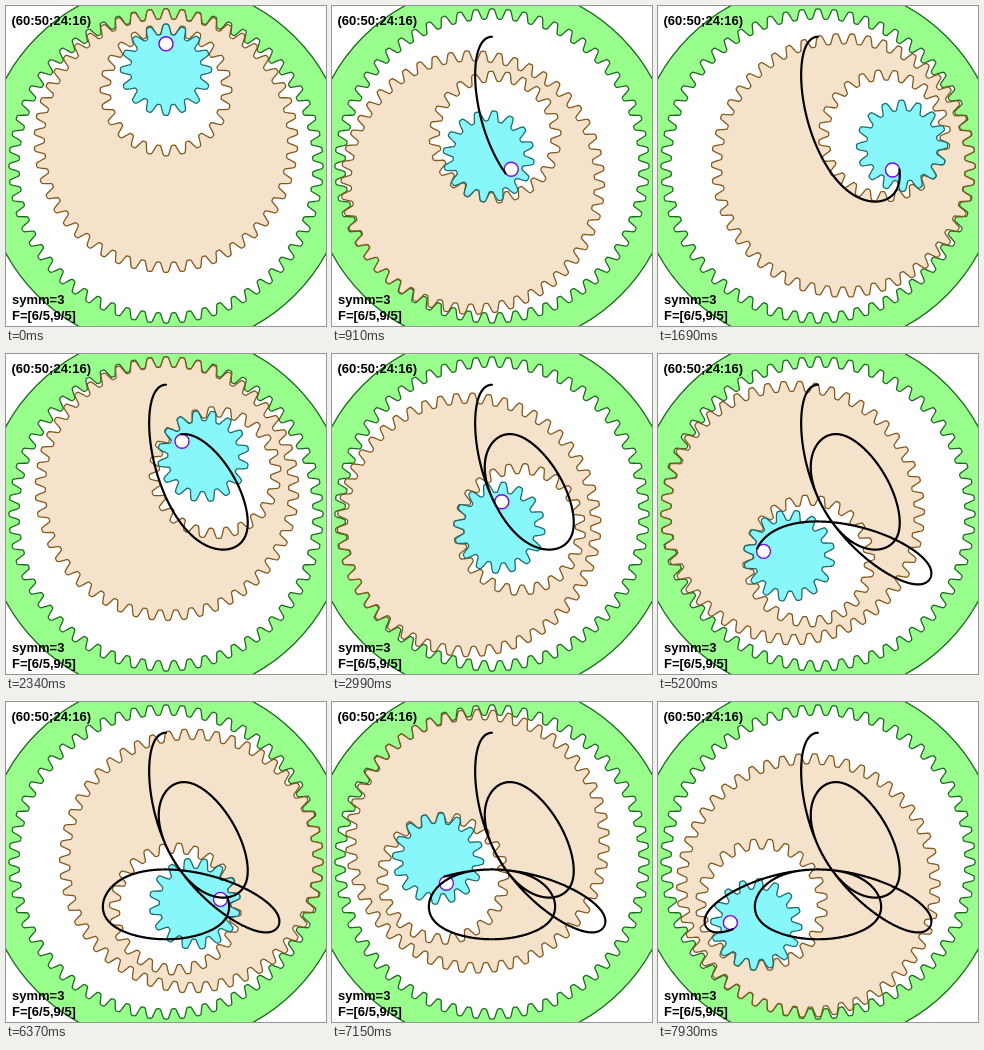
Animation, 320 px wide and 320 px high, one loop 8 s. Source, as an HTML page with a canvas:

```html
<!DOCTYPE html>
<html lang="en">
<head>
<meta charset="utf-8">
<title>Nested gears</title>
<style>
html, body { margin: 0; width: 100%; height: 100%; overflow: hidden; background: #fff; }
canvas { display: block; width: 320px; height: 320px; }
</style>
</head>
<body>
<canvas id="stage"></canvas>
<script>
const LOOP = 8000, STEP = 130;
const STEPS_PER_PERIOD = 89 / 3;   // a third of the full figure
const MID = 160, UNIT = 152 / 60;  // pitch radius per tooth
const RING = 60, WHEEL = 50, HOLE = 24, GEAR = 16;
const HOLE_OFFSET = 20 * UNIT, PEN_OFFSET = 26, PEN_HOLE = 7;
const RIM = 72 * UNIT;
const RAD = Math.PI / 180, UP = -Math.PI / 2;

const canvas = document.getElementById('stage');
const ctx = canvas.getContext('2d');
const dpr = window.devicePixelRatio || 1;
canvas.width = canvas.height = 320 * dpr;

const move = (p, r, a) => ({ x: p.x + r * Math.cos(a), y: p.y + r * Math.sin(a) });

// Both turns are measured counter-clockwise from the upright start.
function pose(wheelTurn, gearTurn) {
  const a = UP - wheelTurn, b = UP - gearTurn;
  const wheelRot = wheelTurn * (RING / WHEEL - 1);
  const ratio = HOLE / GEAR;
  const gearRot = wheelRot * ratio + gearTurn * (ratio - 1);
  const centre = { x: MID, y: MID };
  const wheel = move(centre, (RING - WHEEL) * UNIT, a);
  const hole = move(wheel, HOLE_OFFSET, UP + wheelRot);
  const gear = move(hole, (HOLE - GEAR) * UNIT, b);
  const pin = move(gear, PEN_OFFSET, UP + gearRot);
  const outer = move(centre, RING * UNIT, a);
  const inner = move(hole, HOLE * UNIT, b);
  const pen = move(pin, PEN_HOLE, Math.atan2(outer.y - pin.y, outer.x - pin.x));
  return { wheel, hole, gear, pin, pen, outer, inner, wheelRot, gearRot };
}

// The push of the pen acts on one line through both contact points.
function skew(wheelTurn, gearTurn) {
  const { pin, inner, outer } = pose(wheelTurn, gearTurn);
  return (inner.x - pin.x) * (outer.y - inner.y) - (inner.y - pin.y) * (outer.x - inner.x);
}

function balance(turn, guess) {
  const h = 1e-4;
  for (let i = 0; i < 6; i++) {
    const slope = (skew(turn, guess + h) - skew(turn, guess - h)) / (2 * h);
    const d = skew(turn, guess) / slope;
    guess -= Math.max(-0.1, Math.min(0.1, d));
  }
  return guess;
}

const FINE = 0.5, PERIOD = 600 / FINE;
const track = [];
let gearTurn = 0, length = 0;
for (let i = 0; i <= 1320 / FINE; i++) {
  const turn = i * FINE * RAD;
  gearTurn = balance(turn, gearTurn);
  const pen = pose(turn, gearTurn).pen;
  if (i) length += Math.hypot(pen.x - track[i - 1].pen.x, pen.y - track[i - 1].pen.y);
  track.push({ turn, gearTurn, pen, length });
}
// Pace: half even pen speed, half even turning.
const lap = track[PERIOD].length;
track.forEach((p, i) => { p.when = (p.length / lap + i / PERIOD) / 2 * STEPS_PER_PERIOD; });

// Straight flanks with softened corners, from -1 at the root to 1 at the tip.
function toothLift(phase) {
  const f = Math.asin(Math.cos(phase)) / 0.73;
  return f / Math.pow(1 + Math.pow(f, 6), 1 / 6);
}

function toothPath(p, teeth, rot) {
  const n = teeth * 32;
  for (let i = 0; i < n; i++) {
    const a = i / n * 2 * Math.PI;
    const q = move(p, UNIT * (teeth + 2 * toothLift(teeth * a)), UP + rot + a);
    if (i) ctx.lineTo(q.x, q.y); else ctx.moveTo(q.x, q.y);
  }
  ctx.closePath();
}

function paint(fill, line, width) {
  ctx.fillStyle = fill;
  ctx.strokeStyle = line;
  ctx.lineWidth = width;
  ctx.fill('evenodd');
  ctx.stroke();
}

function circle(p, r) {
  ctx.moveTo(p.x + r, p.y);
  ctx.arc(p.x, p.y, r, 0, 2 * Math.PI);
}

function draw(step) {
  let i = 1;
  while (i < track.length - 1 && track[i].when < step) i++;
  const a = track[i - 1], b = track[i];
  const f = (step - a.when) / (b.when - a.when);
  const mix = key => a[key] + (b[key] - a[key]) * f;
  const s = pose(mix('turn'), mix('gearTurn'));
  const centre = { x: MID, y: MID };

  ctx.setTransform(dpr, 0, 0, dpr, 0, 0);
  ctx.fillStyle = '#fff';
  ctx.fillRect(0, 0, 320, 320);
  ctx.lineJoin = ctx.lineCap = 'round';

  ctx.beginPath();
  circle(centre, RIM);
  toothPath(centre, RING, 0);
  paint('#99ff8c', '#1f6a22', 1.3);

  ctx.beginPath();
  toothPath(s.wheel, WHEEL, s.wheelRot);
  toothPath(s.hole, HOLE, s.wheelRot);
  paint('#f5e2ca', '#85581c', 1.3);

  ctx.beginPath();
  toothPath(s.gear, GEAR, s.gearRot);
  paint('#88f7fb', '#1c6c70', 1.3);

  ctx.beginPath();
  circle(s.pin, PEN_HOLE);
  paint('#fff', '#8000ff', 1.4);

  if (step > 0) {
    ctx.beginPath();
    ctx.moveTo(track[0].pen.x, track[0].pen.y);
    for (let j = 1; j < i; j++) ctx.lineTo(track[j].pen.x, track[j].pen.y);
    ctx.lineTo(s.pen.x, s.pen.y);
    ctx.strokeStyle = '#000';
    ctx.lineWidth = 2.2;
    ctx.stroke();
  }

  ctx.fillStyle = '#000';
  ctx.font = 'bold 13px "Liberation Sans", Arial, sans-serif';
  ctx.fillText('(60:50;24:16)', 5.5, 19);
  ctx.fillText('symm=3', 6, 298);
  ctx.fillText('F=[6/5,9/5]', 6, 314);
}

const start = performance.now();
function tick() {
  const t = (performance.now() - start) % LOOP;
  draw(Math.floor(t / STEP));
  requestAnimationFrame(tick);
}
tick();
</script>
</body>
</html>
```
